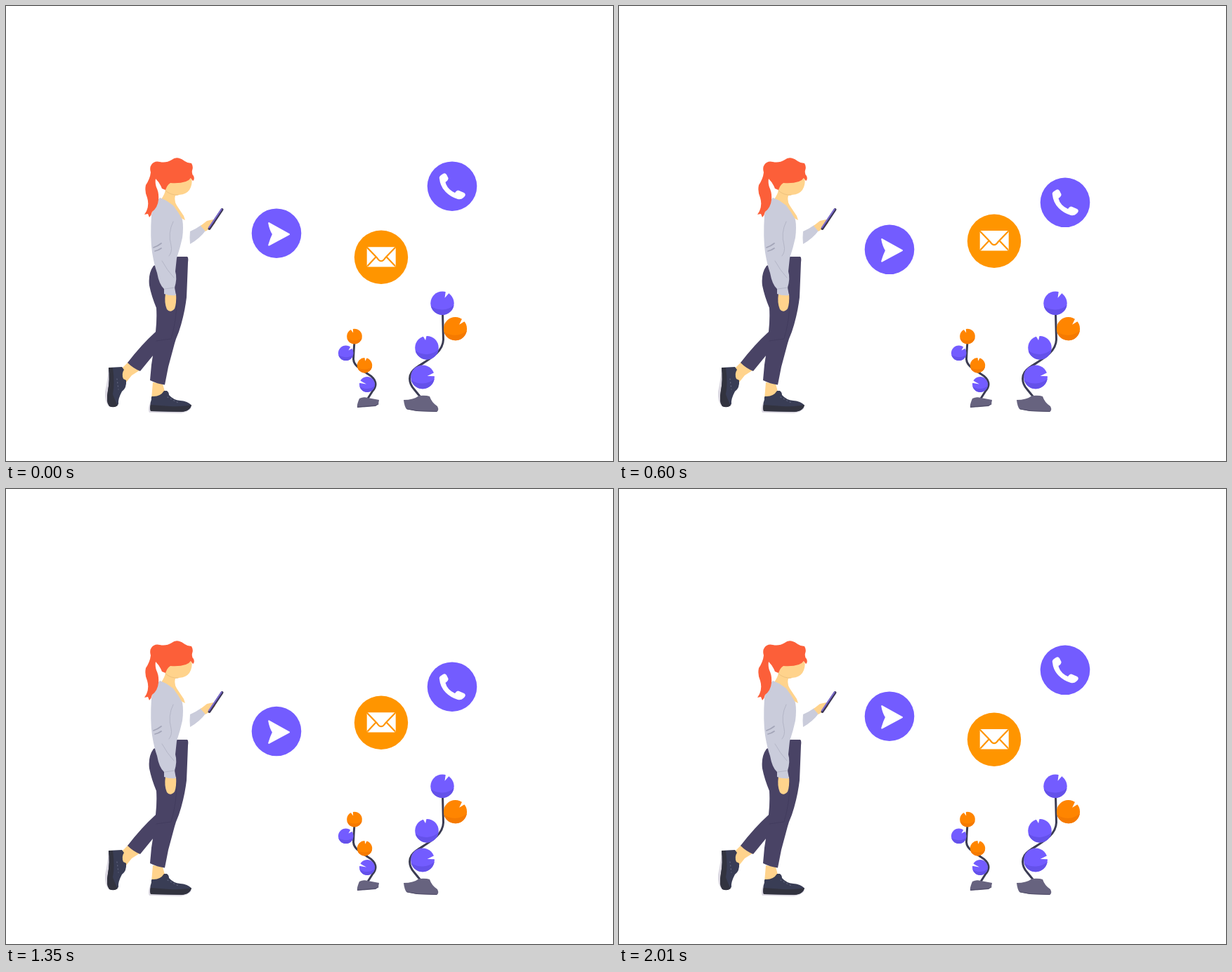
Recreate the animation shown at these times as an HTML page. Size 864x648 px, loop 2040 ms.

```html
<!DOCTYPE html>
<html lang="en">
<head>
<meta charset="utf-8">
<title>Messages on the move</title>
<style>
html, body { margin: 0; width: 100%; height: 100%; overflow: hidden; background: #fff; }
svg { display: block; width: 100vw; height: 100vh; }
.skin { fill: #ffd38c; }
.cloth { fill: #caccdb; }
.shoe { fill: #393d55; }
.sole { fill: #32333f; }
.pale { fill: #dcd9e2; }
.rock { fill: #67637f; }
.line { fill: none; stroke-linecap: round; stroke-linejoin: round; }
.fold { stroke: #b4b6c7; stroke-width: 1; }
.stem { stroke: #3b3c53; stroke-width: 3; }
</style>
</head>
<body>
<svg viewBox="0 0 864 648">
  <!-- back leg -->
  <path class="skin" d="M174 507 L190 519 L179 526 L171 536 L165 530 L165 516Z"/>
  <path class="pale" d="M146 515 Q145 531 141 549 Q140 565 147 570 L153 571 L155 528Z"/>
  <path class="shoe" d="M146 515 L165 514 L168 518 Q164 524 167 531 L171 533 Q172 544 165 549 Q159 560 160 567 Q155 573 147 570 Q142 564 145 548 Q148 532 146 515Z"/>
  <path class="sole" d="M146 515 L152 515 Q155 537 152 553 Q155 562 159 569 Q154 573 147 570 Q142 564 145 548 Q148 532 146 515Z"/>
  <!-- front foot -->
  <path class="skin" d="M209 536 L223 538 L226 549 L220 558 L207 560Z"/>
  <path class="pale" d="M206 563 Q201 574 204 579 L249 580 Q260 578 264 572Z"/>
  <path class="shoe" d="M207 560 Q206 555 210 556 Q220 556 225 548 L229 548 Q232 550 232 554 Q238 561 248 562 Q260 563 264 569 Q262 577 250 578 L206 577 Q204 569 207 560Z"/>
  <path class="sole" d="M206 568 L233 570 Q250 571 264 568 Q262 577 250 578 L206 577 Q204 573 206 568Z"/>
  <path class="line" stroke="#62667f" stroke-width="1.2" stroke-dasharray="1 4" d="M230 557 L245 565 M158 531 L160 546"/>
  <!-- trousers -->
  <path fill="#494365" d="M242 357 L258 357 Q260 358 259 365 Q258 392 257 415 Q254 440 246 464 L242 474 Q240 480 238 488 L231 514 L226 539.5 Q215 538 205 533 L207 511 L209 498 L191 520 Q181 516 173 508 Q193 482 213 464 Q215 446 214 430 Q207 413 204 398 Q202 381 210 370Z"/>
  <path class="line" stroke="#423c5e" d="M243 419 Q243 447 235 474 L214 477"/>
  <!-- torso and arms -->
  <path class="skin" d="M226 258 L234 250 L257 249 L264 245 Q266 254 261 262 Q256 269 246 269 L241 270 Q239 278 243 284 L253 299 L255 305 L249 302 L221 275 Q226 268 227 262Z"/>
  <path class="line" stroke="#efc17d" d="M227 263 Q235 270 245 269"/>
  <path class="skin" d="M227 409 L242 410 Q243 423 240 431 Q234 438 229 432 Q225 423 227 409Z"/>
  <path class="cloth" d="M219 273 Q210 281 207 298 Q205 330 208 351 Q211 369 215 380 Q218 397 225 403 L225 410 Q233 413 242 412 L240 401 Q244 388 241 378 L243 359 Q248 344 251 330 Q253 315 251 304 Q245 293 238 284 L228 277Z"/>
  <path class="line fold" d="M238 307 Q230 323 235 341 Q237 350 232 356 M222 363 Q229 376 239 387 M226 403 L240 401"/>
  <path class="line" stroke="#a3a5b8" stroke-width="1.7" d="M210 344 Q216 342 221 338 M212 349 Q217 348 221 345"/>
  <path class="cloth" d="M262 321 Q271 317 278 312 L284 320 Q276 331 262 339 Q261 330 262 321Z"/>
  <path class="skin" d="M277 313 L286 306 L295 304 L298 309 L293 315 L284 321Z"/>
  <path class="line" stroke="#3b3555" stroke-width="4" d="M289.5 317 L307.5 290"/>
  <path class="line" stroke="#7c6cd0" stroke-width="2" d="M289 315.5 L306.8 289.3"/>
  <!-- hair -->
  <path fill="#fc5f39" d="M219 222 Q211 220 207 226 Q204 230 206 237 Q205 246 199 255 Q197 264 201 273 Q204 283 200 292 L197 297 L202 296 L204 301 Q207 298 208 293 Q216 287 217 276 Q218 266 214 258 Q212 252 213 246 Q219 252 222 260 L227 262 Q229 255 234 252 Q247 253 256 250 Q260 249 263 245 L266 249 Q269 247 267 242 Q264 239 265 234 Q267 229 264 224 Q258 224 253 220 Q243 213 236 219 Q228 224 219 222Z"/>
  <!-- plants -->
  <path class="line stem" d="M496 478 Q495 490 494.5 503 C495 513 506 517 515 524 C527 531 529 540 522 548 L515 559 M621.5 438 L622.5 475 C622 495 598 505 584 515 C571 524 573 537 581 546 L590 557"/>
  <g id="balls"></g>
  <path class="rock" d="M503 559 Q509 556 515 558 L531 561 L530 567 L526 570 L500 572 Q499 568 503 559Z"/>
  <path class="rock" d="M566 561 Q580 561 588 555 Q598 554 603 556 Q606 565 614 570 Q617 576 613 578 L585 577 L570 574 Q567 570 566 561Z"/>
  <path class="line" stroke="#514e69" d="M501 571 L526 569 L530 567 M571 574 L585 576.5 L613 577.5"/>
  <!-- floating badges -->
  <g id="send">
    <circle cx="385" cy="323.7" r="35.3" fill="#735cff"/>
    <path class="line" style="fill:#fff" stroke="#fff" stroke-width="2" d="M374.2 309 L403 325 L374.2 340.5 Q377 331 380 325 Q376 319 374.2 309Z"/>
  </g>
  <g id="mail">
    <circle cx="534" cy="357.8" r="38.2" fill="#ff9500"/>
    <rect x="513.7" y="343.2" width="41" height="28.4" rx="2.2" fill="#fff"/>
    <path class="line" stroke="#ff9500" stroke-width="2.2" d="M514.5 344.5 L528 358.5 Q534 368 540 358.5 L553.5 344.5 M515 369.8 L526 358 M553.4 369.8 L542.2 358"/>
  </g>
  <g id="call">
    <circle cx="635" cy="256.7" r="35.3" fill="#735cff"/>
    <path fill="#fff" d="M617 246 Q616 243 619 241 L622 239 Q625 237 627 240 L629.5 245 Q630 248 625.5 251 Q628 261 639 266 Q642 261 645 263 L652 266 Q655 268 653 271 L651 273 Q648 276 643 275 Q633 272 626 265 Q618 257 617 246Z"/>
  </g>
</svg>
<script>
const $ = id => document.getElementById(id);
const violet = ["#735cff", "#6451ea"], orange = ["#ff8500", "#f57a00"];

// Round leaf with a darker underside and a wedge cut out at the given angle.
function ball(x, y, r, [light, dark], angle, depth) {
  const at = (deg, k) => {
    const a = deg * Math.PI / 180;
    return `${r * k * Math.cos(a)} ${r * k * Math.sin(a)}`;
  };
  return `<g transform="translate(${x} ${y})"><circle r="${r}" fill="${light}"/>
    <path fill="${dark}" d="M${at(165, 1)} A${r} ${r} 0 0 0 ${at(10, 1)} A${r * 1.6} ${r * 1.6} 0 0 1 ${at(165, 1)}"/>
    <path fill="#fff" d="M${at(angle - 9, 1.06)} L${at(angle, depth)} L${at(angle + 9, 1.06)}Z"/></g>`;
}

$("balls").innerHTML = [
  [496, 470.5, 10.8, orange, -110, .5],
  [483.7, 494.3, 10.8, violet, -45, .5],
  [510.5, 511.7, 10.7, orange, -82, .55],
  [514, 539, 11, violet, -160, .1],
  [621, 423.3, 16.7, violet, -65, .5],
  [639.5, 459.7, 16.6, orange, -47, .5],
  [599, 486.7, 16.8, violet, -100, .65],
  [593, 528.3, 16.9, violet, -12, .4]
].map(b => ball(...b)).join("");

const loop = 2040, step = 30, peak = 990, travel = 38.1;
const shift = (t, end) =>
  travel * (t < peak ? t / peak : Math.max(0, (end - t) / (end - peak)));
const move = (id, y) => $(id).setAttribute("transform", `translate(0 ${y})`);

function draw(now) {
  const t = Math.floor(now % loop / step) * step;
  const y = shift(t, loop);
  move("send", shift(t, 1808));
  move("mail", -y);
  move("call", y);
  requestAnimationFrame(() => draw(performance.now()));
}
draw(performance.now());
</script>
</body>
</html>
```
